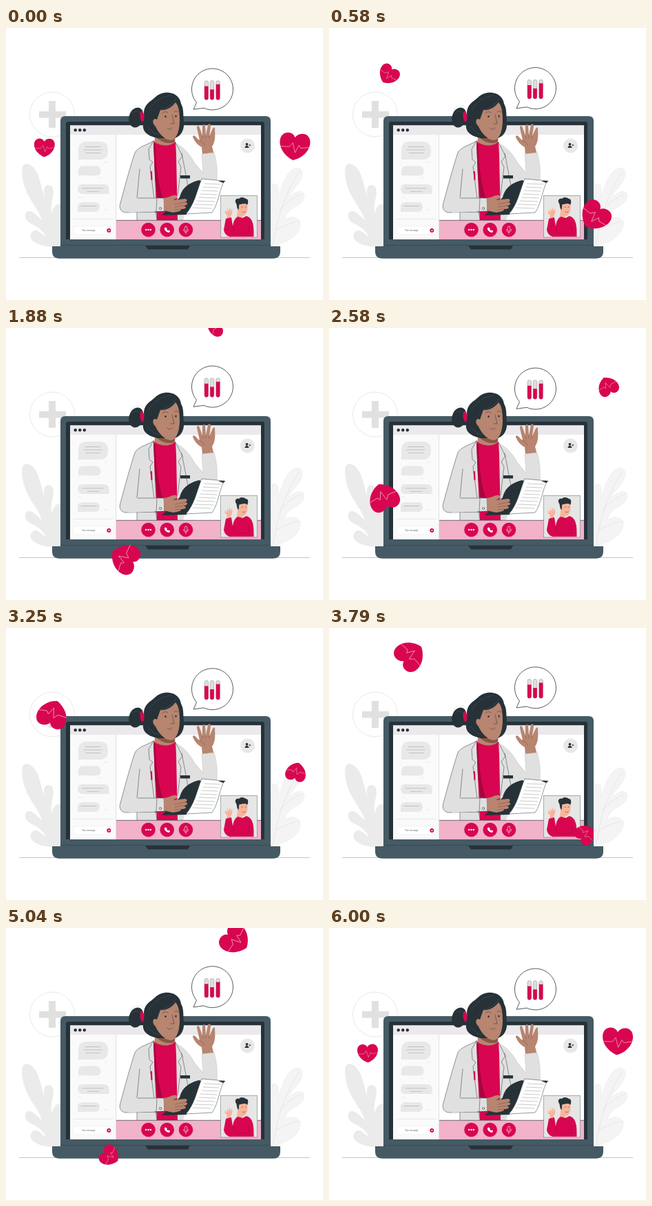
An HTML page that plays this animation: 460x395 px, repeating every 6040 ms.

```html
<!DOCTYPE html>
<html lang="en">
<head>
<meta charset="utf-8">
<title>Online doctor</title>
<style>
html, body { margin: 0; height: 100%; overflow: hidden; background: #fff; }
svg { display: block; width: 100vw; height: 100vh; }
.red { fill: #d80650; }
.dark { fill: #263238; }
.steel { fill: #455a64; }
.skin { fill: #b78570; }
.coat { fill: #e0e0e0; }
.peach { fill: #f7b49a; }
.line, .crease, .soft, .pale, .white { fill: none; stroke-width: .6; stroke-linecap: round; stroke-linejoin: round; }
.line { stroke: #263238; stroke-width: .5; }
.crease { stroke: #875646; }
.soft { stroke: #a6a6a6; }
.pale { stroke: #dcdcdc; }
.white { stroke: #fff; }
</style>
</head>
<body>
<svg viewBox="0 0 460 395">
  <defs>
    <g id="heart">
      <path class="red" d="M-1 20C-11 16-22 6-22-6.500C-22-15.500-16-19.500-10.500-19.500C-5.500-19.500-2-17-.5-13C2-17 6-19 11-19C18-19 22-13 22-6.500C22 6 11 17-1 20Z"/>
      <path fill="none" stroke="#f3b9cd" stroke-width=".7" d="M-21 1L-8 1L-3-5L1 9L6-2L9 2L21 0"/>
    </g>
    <rect id="tube" y="77.300" width="5.600" height="27.700" rx="2.800" fill="#dedede" stroke="#8a8a8a" stroke-width=".5"/>
  </defs>

  <!-- background -->
  <circle cx="67" cy="125.500" r="32.500" fill="#fff" stroke="#e2e2e2" stroke-width=".8"/>
  <path d="M62 106h10v15h15v9.500H72V145H62V130.500H48V121H62Z" fill="#e0e0e0"/>
  <path fill="#ebebeb" d="M79 318C62 319 44 316 37 307C33 300 38 293 44 294C49 295 53 301 58 303C54 295 47 289 38 285C28 281 25 272 30 267C37 263 45 273 52 279C49 268 41 259 34 246C26 233 21 212 24 201C29 193 39 199 45 210C50 222 53 237 56 248C54 238 54 229 61 228C69 228 70 237 68 246C66 253 65 261 66 270C68 261 72 254 79 256Z"/>
  <path fill="#f4f4f4" stroke="#ececec" stroke-width=".7" d="M384 318V232C386 224 393 224 395 232C396 238 394 243 394 248C399 235 403 216 414 207C422 200 431 203 430 212C429 225 414 236 408 248C417 239 428 234 432 240C435 247 429 256 419 260C411 264 406 269 404 279C412 272 423 274 427 281C429 292 419 305 404 311Z"/>
  <path class="pale" d="M388 313C392 282 404 240 426 208M397 264C406 255 417 246 429 241M392 293C404 287 415 282 425 281"/>
  <path d="M19 333.500H441" stroke="#b5b5b5" stroke-width=".8"/>

  <!-- laptop -->
  <path class="steel" d="M79 318V135Q79 128 86 128H377Q384 128 384 135V318Z"/>
  <path class="dark" d="M87 307V139Q87 136 90 136H372Q375 136 375 139V307Z"/>
  <path fill="#fff" d="M93 141.500H370V307H93Z"/>
  <path fill="#ebe9ec" d="M93 141.500H370V155H93Z"/>
  <path class="steel" d="M67 317H398V325Q398 334.700 388 334.700H77Q67 334.700 67 325Z"/>
  <path d="M79 315.500H384" stroke="#36474f" stroke-width=".7"/>
  <path class="dark" d="M202 316H267L264 321.500H206Z"/>
  <g class="dark"><circle cx="100.700" cy="148.300" r="2.200"/><circle cx="107.200" cy="148.300" r="2.200"/><circle cx="113.800" cy="148.300" r="2.200"/></g>

  <!-- chat -->
  <path fill="#fafafa" d="M93 155H160V307H93Z"/>
  <path d="M159.500 155V307" stroke="#dadada" stroke-width=".8"/>
  <g fill="#e8e8e8">
    <path d="M105 191V178Q105 165 117 165H136Q148 165 148 178Q148 191 136 191Z"/>
    <path d="M105 214V207Q105 200.500 112 200.500H130.500Q137.500 200.500 137.500 207.500Q137.500 214.500 130.500 214.500Z"/>
    <path d="M149.500 241V234Q149.500 227 142 227H111Q104 227 104 234Q104 241 111 241Z"/>
    <path d="M104 267V260Q104 253 111 253H129Q136 253 136 260Q136 267 129 267Z"/>
  </g>
  <path class="soft" d="M115 172.500H137M113 177H139M116 181.500H137M111 232.800H141M118 237.300H135M109 258.500H131"/>
  <path class="pale" d="M143 195H147M133 218H137M106 246H110M143 264H147M98 277.500H155"/>
  <rect x="97" y="288" width="59" height="12" rx="6" fill="#fff" stroke="#ececec" stroke-width=".7"/>
  <text x="110" y="295" font-family="Inter, Arial, sans-serif" font-size="2.900" fill="#455a64">Your message</text>
  <circle class="red" cx="149.300" cy="294" r="3"/>
  <path d="M147.800 294L150.800 292.700L149.800 295.500Z" fill="#fff"/>

  <!-- doctor -->
  <path class="pale" d="M180 120A13 13 0 0 1 199 115"/>
  <path class="skin" d="M285 184L284 173C278 170 273 164 271 158C271 155 275 156 278 161L281 163L277 145C277 141 280 141 281 145L285 156L285 143C286 139 289 139 289 143L290 156L293 141C294 138 297 139 297 142L295 157L300 146C302 143 304 145 303 148C304 158 303 167 299 172L302 184Z"/>
  <path class="crease" d="M281 163C284 165 287 167 288 170M285 157L286 160M290 156V159M295 157L294 160"/>
  <path class="coat" d="M244 167C258 172 267 183 274 196L286 210L284 183L302 181C306 195 307 207 306 221C300 232 286 237 272 232L257 279H244Z"/>
  <path fill="none" stroke="#c9c9c9" stroke-width=".6" d="M286 210L284 183L302 181C306 195 307 207 306 221M249 169C259 174 268 185 274 197L286 211"/>
  <path id="coat" class="coat" d="M215 163C205 170 192 172 187 181C180 202 172 232 166 254C163 263 168 268 175 268L190 267V279H256L263 228L256 181L246 166Z"/>
  <path class="line" d="M214 164C205 170 192 172 187 181C180 202 172 232 166 254C163 263 168 268 175 268L229 267M190 267V279M190 247L194 205M255 182L264 229"/>
  <path class="skin" d="M217 145L246 151L245 172L232 178L215 172Z"/>
  <path fill="#875646" d="M217 149C222 158 230 163 245 161L244 166C232 169 222 164 217 157Z"/>
  <path class="red" d="M214 164C221 171 237 174 246 165L247 184L249 279H219L216 215Z"/>
  <path fill="#a8043e" d="M214 167L216 215L220 250L227 246C219 220 217 190 217 169Z"/>
  <path class="line" d="M214 164L207 176L208 191L213 195L209 201L219 279M246 166L256 186L250 194L254 202L249 243"/>
  <path class="red" d="M209.500 208H212L212.500 221H210.500Z"/>
  <path class="dark" d="M253 214H267V218.500H253Z"/>

  <ellipse class="dark" cx="189" cy="130" rx="10.500" ry="14.700" transform="rotate(15 189 130)"/>
  <path class="dark" d="M200 122C202 109 210 107 216 101C222 95 230 93 237 94C247 95 253 102 254 110C258 117 257 124 258 137C259 148 254 157 245 160L220 160C212 158 203 155 200 148C197 141 201 134 200 122Z"/>
  <path class="skin" d="M224 119C233 120 241 115 246 108C251 113 252 124 252 134C252 147 249 160 240 163C230 163 221 152 217 143C211 138 213 129 219 133Z"/>
  <path class="red" d="M197 120C193 124 194 133 198 137C202 133 201 125 197 120Z"/>
  <path class="line" d="M227 124C229 121 232 121 235 123M244 122C246 120 248 121 250 122M241 126L244 139L239 139M234 145C236 148 239 148 241 145"/>
  <g class="dark"><ellipse cx="231.500" cy="128.500" rx="1.200" ry="1.600"/><ellipse cx="246.500" cy="128" rx="1.200" ry="1.600"/></g>
  <path fill="none" stroke="#4a5a62" stroke-width=".5" d="M207 119C215 106 225 100 239 98M205 143C212 150 214 153 222 155M183 124C187 119 193 120 196 126M224 119C234 117 243 110 247 102"/>

  <!-- notes -->
  <path class="dark" d="M226 272L252 246C255 235 261 226 280 221L289 224L262 271Z"/>
  <path fill="#fff" stroke="#263238" stroke-width=".5" d="M284 219L317 222C309 235 309 254 299 268L261 270C273 258 277 236 284 219Z"/>
  <path class="dark" d="M308 222H318.500L315 225Z"/>
  <path class="soft" d="M288 226L311 227M286 231L309 232M284 236L307 237M282 241L306 242M280 246L304 247M277 251L303 252M274 256L301 257M271 261L298 262"/>
  <path class="coat" d="M190 246L229 247L230 266L178 268Z"/>
  <path class="line" d="M191 247L229 247L230 266L215 267M219 247L218 267"/>
  <circle class="line" cx="224" cy="262" r="1.700"/>
  <path class="skin" d="M229 247C238 246 241 242 247 243L249 246L242 250L260 248C264 249 263 252 260 253L263 254C264 257 260 258 258 258L261 260C261 263 256 263 254 263C255 266 248 267 243 268C237 267 234 266 229 265Z"/>
  <path class="crease" d="M260 253L245 256M258 258L245 260M254 263L245 264"/>

  <!-- call bar -->
  <path fill="#f2b2ca" d="M160 279H370V307H160Z"/>
  <path d="M160 279.300H370" stroke="#37474f" stroke-width=".7"/>
  <g class="red"><circle cx="206.500" cy="293" r="10.300"/><circle cx="233.700" cy="293" r="10.300"/><circle cx="261" cy="293" r="10.300"/></g>
  <g fill="#fff"><circle cx="203.200" cy="293" r="1.200"/><circle cx="206.500" cy="293" r="1.200"/><circle cx="209.800" cy="293" r="1.200"/>
    <path d="M230 290.500C231 289 232 289 233 290.500L233.800 292C233 293 234 294 235 294L236.500 293.500C238 294 238.500 295.500 237 296.700C234.500 298 229 293.500 230 290.500Z"/></g>
  <rect class="white" x="259.300" y="288" width="3.400" height="7" rx="1.700"/>
  <path class="white" d="M257.500 292.500C257.500 298 264.500 298 264.500 292.500M261 296.700V299"/>

  <!-- contact -->
  <circle cx="350.500" cy="171" r="10.500" fill="#e8e8e8"/>
  <circle class="dark" cx="349.500" cy="168.800" r="1.900"/>
  <path class="dark" d="M346.500 174C346.500 170 352.500 170 352.500 174ZM352.500 169.700h1v-1h.8v1h1v.8h-1v1h-.8v-1h-1z"/>

  <!-- patient -->
  <rect x="311.500" y="243.500" width="53" height="60.500" fill="#e6e6e6" stroke="#6d7c84" stroke-width=".6"/>
  <path class="peach" d="M320 277L321 272C317 269 317 265 319 265L321 268L321 261L323 266L325 260L326 266L328 262C329 267 328 271 326 273L326 278Z"/>
  <path class="peach" d="M336 255C338 250 350 251 350.500 258C351 267 348 273 343 273L343 277H334L336 268Z"/>
  <path class="red" d="M319 277L327 275L329 288C330 280 333 275 337 274L343 276L349 273C358 276 360 285 359.500 303H329C321 304 317 299 316 293Z"/>
  <path class="dark" d="M337 264C334 260 336 257 333 253C332 249 335 247 338 248C341 245 345 246 348 248C352 248 352 254 350 257C347 253 343 256 339 256C337 258 339 261 337 264Z"/>
  <path class="line" d="M342 260H343.500M347 260H348.500M343 267C345 268 346 268 347 266.500"/>
  <path fill="none" stroke="#a5033d" stroke-width=".5" d="M329 288L331 298M333 299L352 298M352 287L353 298"/>

  <!-- speech bubble -->
  <g id="bubble">
    <path fill="#fff" stroke="#263238" stroke-width=".8" d="M276.500 109A30 30 0 1 1 287 117L272 119Z"/>
    <use href="#tube" x="288"/><use href="#tube" x="296.200"/><use href="#tube" x="304.800"/>
    <g class="red">
      <path d="M288 85.300H293.600V102.200A2.800 2.800 0 0 1 288 102.200Z"/>
      <path d="M296.200 90H301.800V102.200A2.800 2.800 0 0 1 296.200 102.200Z"/>
      <path d="M304.800 82.500H310.400V102.200A2.800 2.800 0 0 1 304.800 102.200Z"/>
    </g>
  </g>

  <!-- orbiting hearts -->
  <g id="orbit">
    <use href="#heart" transform="translate(419 168.600) rotate(3)"/>
    <use href="#heart" transform="translate(56 177.300) rotate(-2) scale(.68)"/>
  </g>
</svg>
<script>
const FRAMES = 145, LOOP = 6040, STEP = 1000 / 24;
const orbit = document.getElementById('orbit');
const bubble = document.getElementById('bubble');
const start = performance.now();

function draw() {
  const t = (performance.now() - start) % LOOP;
  const turn = Math.min(FRAMES - 1, Math.floor((t + 5) / STEP)) / FRAMES;
  const lift = .8 + 2.2 * (1 - Math.cos(turn * 4 * Math.PI));
  orbit.setAttribute('transform', `rotate(${turn * 360 + 1.1} 240.5 169.5)`);
  bubble.setAttribute('transform', `translate(0 ${-lift})`);
  requestAnimationFrame(draw);
}
draw();
</script>
</body>
</html>
```
